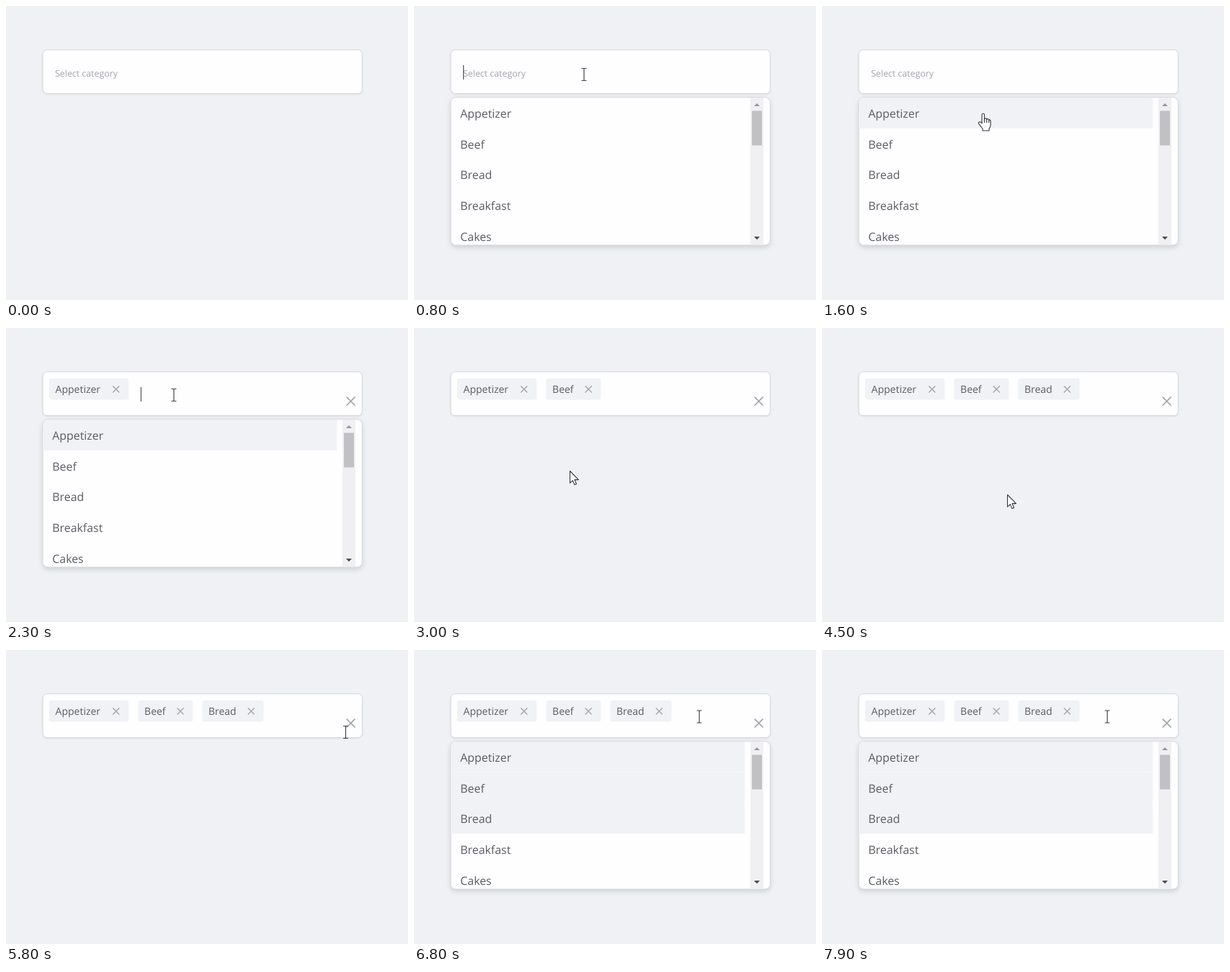
An HTML page for the animation above (8 s loop, 558 by 408 pixels).

```html
<!DOCTYPE html>
<html lang="en">
<head>
<meta charset="utf-8">
<title>Category multiselect</title>
<style>
  html, body { margin: 0; width: 100%; height: 100%; overflow: hidden; background: #f0f1f5; }
  svg { display: block; }
  text { font-family: "Open Sans", "Noto Sans", sans-serif; fill: #5b5c63; text-rendering: geometricPrecision; }
  .placeholder { font-size: 12.4px; fill: #a1a5ae; }
  .chip text { font-size: 14px; }
  .chip rect, .row rect { fill: #f0f2f5; }
  .row text { font-size: 15.9px; }
  .cross { fill: none; stroke: #9fa4ae; }
  .field { filter: drop-shadow(0 1px 1px rgba(0,0,0,.07)); }
  .panel { filter: drop-shadow(0 3px 3px rgba(0,0,0,.13)); }
  .box { fill: #fefdff; stroke: #d3d6db; }
  .pointer { fill: #fff; stroke: #33343a; stroke-width: 1.1; stroke-linejoin: round; stroke-linecap: round; }
</style>
</head>
<body>
<svg id="stage" width="558" height="408" viewBox="0 0 558 408">
  <defs>
    <clipPath id="inside"><rect x="51.5" y="127" width="442.5" height="204.5" rx="6"/></clipPath>
  </defs>

  <rect class="box field" x="51" y="60.8" width="443.4" height="60.8" rx="6"/>
  <text class="placeholder" id="placeholder" x="68" y="97.6">Select category</text>
  <g id="chips"></g>
  <path class="cross" id="clear" stroke-width="1.7" d="M472.7 95.7l11.8 11.8m0-11.8l-11.8 11.8"/>
  <rect id="caret" y="82" width="1.3" height="20" fill="#5b5c63"/>

  <g id="list">
    <rect class="box panel" x="51" y="126.7" width="443.4" height="205.2" rx="7"/>
    <g clip-path="url(#inside)">
      <g id="rows"></g>
      <rect x="467" y="127" width="18" height="205" fill="#f0eff2"/>
      <rect x="469" y="145.5" width="14" height="48" fill="#c1c0c3"/>
      <path d="M472 139l4-4 4 4z" fill="#98979b"/>
      <path d="M472 320l4 4.3 4-4.3z" fill="#4c4b50"/>
    </g>
  </g>

  <g id="cursor">
    <path class="pointer" id="arrow" d="M.5 .5V17.2L4.3 13.6L6.9 19.6L9.5 18.5L7 12.6H12.4Z"/>
    <g class="pointer" id="hand">
      <path d="M-2 14V2Q-2 .3-.3 .3T1.4 2V8.2Q1.7 6.8 3.1 6.9T4.7 8.5Q5.1 7.5 6.3 7.7T7.7 9.4Q8.2 8.6 9.1 9T10 10.8V16Q10 19 8 21V24H-1V21.5L-6.2 14.7Q-7.3 12.6-5.6 11.9T-2 14Z"/>
      <path d="M1.4 8V12.4M4.7 8.5V12.4M7.7 9.4V12.6" fill="none"/>
    </g>
    <path id="beam" d="M-3.5-8.5H-1Q0-8.5 0-7.5Q0-8.5 1-8.5H3.5M0-7.5V7.5M-3.5 8.5H-1Q0 8.5 0 7.5Q0 8.5 1 8.5H3.5" fill="none" stroke="#45464c" stroke-width="1.2"/>
  </g>
</svg>
<script>
const LOOP = 8000, TICK = 100, BLINK = 540, ROW = 42.67, TOP = 127;
const items = ["Appetizer", "Beef", "Bread", "Breakfast", "Cakes"];
const chipBoxes = [[60, 110], [183.5, 75.8], [272.3, 85.2]];
const carets = [68, 186.8, 275.8, 374.4];
const picks = [1700, 3000, 4500];
const opens = [[800, 1700], [2300, 3000], [3600, 4500], [6200, LOOP]];

// Pointer path: time, x, y
const path = [
  [700, 236, 95], [1100, 236, 95], [1600, 224, 149], [1900, 224, 149],
  [2300, 233, 93], [2900, 216, 198], [3100, 216, 198], [3600, 288, 95],
  [3700, 288, 95], [4400, 257, 231], [4600, 257, 231], [5500, 470, 119],
  [5800, 471.5, 114], [6200, 396, 92.5]
];

const $ = id => document.getElementById(id);
const show = (el, on) => el.style.display = on ? "" : "none";
const ease = p => p * p * (3 - 2 * p);

function add(parent, tag, attrs = {}, label = "") {
  const el = document.createElementNS("http://www.w3.org/2000/svg", tag);
  for (const key in attrs) el.setAttribute(key, attrs[key]);
  el.textContent = label;
  return parent.appendChild(el);
}

const rows = items.map((name, i) => {
  const g = add($("rows"), "g", { class: "row" });
  const fill = add(g, "rect", { x: 51, y: TOP + i * ROW, width: 408, height: ROW });
  add(g, "text", { x: 64.3, y: 155 + i * ROW }, name);
  return fill;
});

const chips = chipBoxes.map(([x, w], i) => {
  const g = add($("chips"), "g", { class: "chip" });
  add(g, "rect", { x, y: 70, width: w, height: 29.5, rx: 3 });
  add(g, "text", { x: x + 8.6, y: 90 }, items[i]);
  add(g, "path", { class: "cross", "stroke-width": 1.3, d: `M${x + w - 21.7} 80.5l9 9m0-9l-9 9` });
  return g;
});

function pointerAt(t) {
  const next = path.findIndex(k => k[0] > t);
  if (next < 0) return path[path.length - 1].slice(1);
  const [t0, x0, y0] = path[Math.max(0, next - 1)];
  const [t1, x1, y1] = path[next];
  const p = ease(Math.max(0, t - t0) / (t1 - t0));
  return [x0 + (x1 - x0) * p, y0 + (y1 - y0) * p];
}

function render(t) {
  const count = picks.filter(p => t >= p).length;
  const span = opens.find(([from, to]) => t >= from && t < to);
  const [x, y] = pointerAt(t);
  const inField = y > 60 && y < 122;
  const hovered = span && y >= TOP && x < 459 ? Math.floor((y - TOP) / ROW) : -1;

  show($("placeholder"), !count);
  show($("clear"), count);
  chips.forEach((chip, i) => show(chip, i < count));
  show($("list"), span);
  rows.forEach((row, i) => show(row, i < count || i === hovered));

  show($("caret"), span && Math.floor((t - span[0]) / BLINK) % 2 === 0);
  $("caret").setAttribute("x", carets[count]);

  show($("cursor"), t >= path[0][0]);
  $("cursor").setAttribute("transform", `translate(${x.toFixed(1)} ${y.toFixed(1)})`);
  show($("beam"), inField);
  show($("hand"), hovered >= 0);
  show($("arrow"), !inField && hovered < 0);
}

const start = performance.now();
function frame() {
  const t = (performance.now() - start) % LOOP;
  render(Math.floor(t / TICK) * TICK);
  requestAnimationFrame(frame);
}
frame();
</script>
</body>
</html>
```
